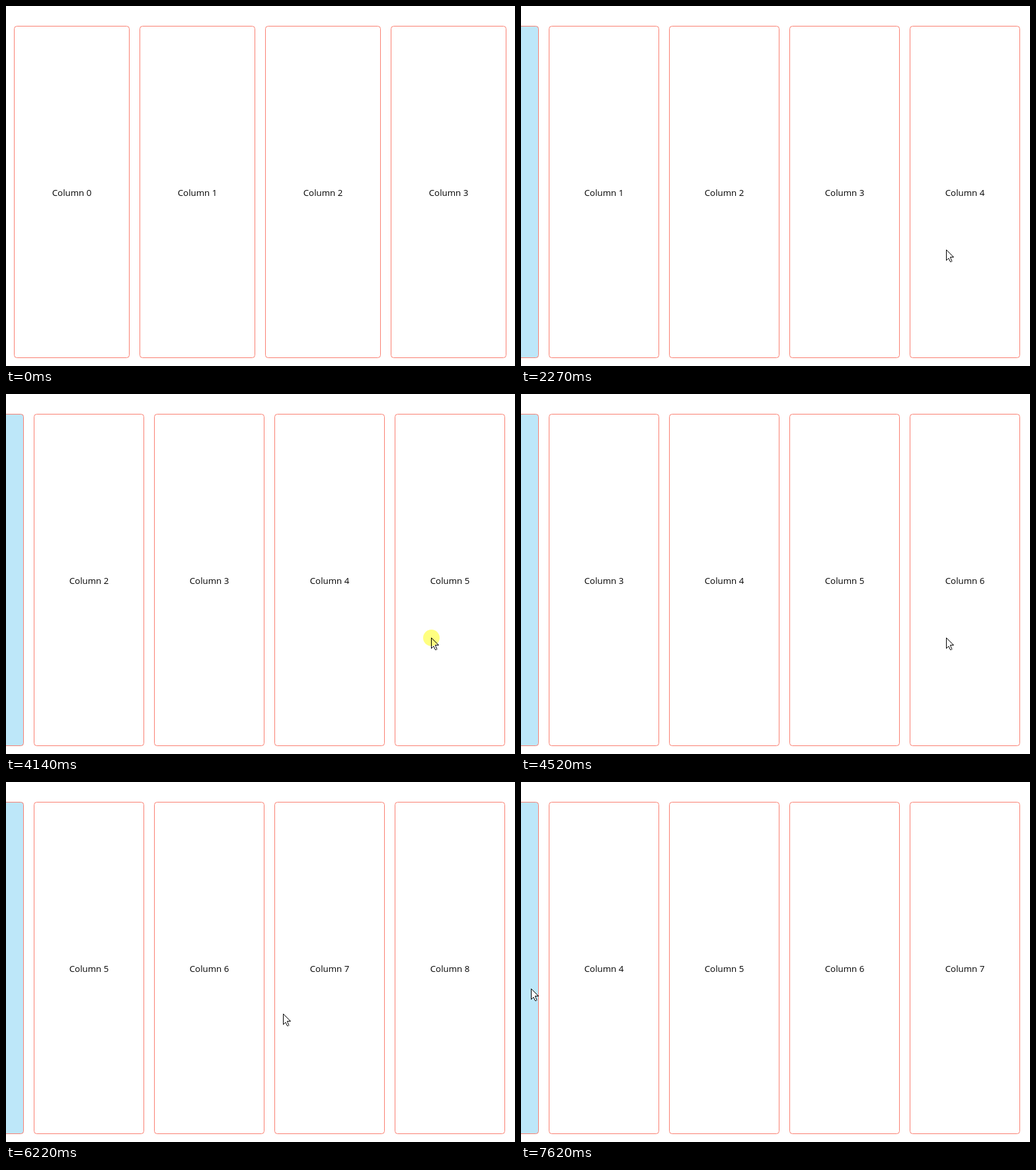
Recreate the animation shown at these times as an HTML page with a canvas. Size 770 by 544 pixels, loop 8 s.

```html
<!DOCTYPE html>
<html lang="en">
<head>
<meta charset="utf-8">
<title>Sliding columns</title>
<style>
  html, body { margin: 0; width: 100%; height: 100%; overflow: hidden; background: #fff; }
  canvas { display: block; }
</style>
</head>
<body>
<canvas width="770" height="544"></canvas>
<script>
const ctx = document.querySelector('canvas').getContext('2d');
const LOOP = 8000, TICK = 76, DELAY = 26, SLIDE = 300;

// Every click opens one more column; the last one goes back.
const clicks = [1850, 3230, 4140, 5110, 5840, 7230];

// Pointer key points: [time, x, y]
const path = [
  [660, 653, 537], [930, 621, 430], [1200, 628, 387], [1350, 628, 387], [1500, 643, 368],
  [6140, 643, 368], [6380, -20, 316], [6680, 14, 312], [LOOP, 15, 312]
];
const arrow = new Path2D('M.5 .5V16.5L3.9 13.1L6.5 18.5H8L8.9 17.6L6.4 11.5H11.5Z');

const clamp = v => Math.min(1, Math.max(0, v));
const mix = (a, b, p) => a + (b - a) * p;

// The CSS "ease" curve, cubic-bezier(.25, .1, .25, 1)
function ease(x) {
  let lo = 0, hi = 1;
  for (let i = 0; i < 20; i++) {
    const s = (lo + hi) / 2;
    if (.75 * s * (1 - s) + s ** 3 < x) lo = s; else hi = s;
  }
  return x >= 1 ? 1 : .3 * lo * (1 - lo) ** 2 + 3 * lo * lo * (1 - lo) + lo ** 3;
}

function drawColumn(i, depth) {
  const x = depth < 1 ? mix(12 + 190 * i, 182 * i - 140, depth) : 42 + 182 * (i - depth);
  const w = 175 - 8 * Math.min(depth, 1);
  ctx.beginPath();
  ctx.roundRect(x + .5, 30.5, w - 1, 501, 4);
  ctx.fillStyle = `rgba(127, 209, 243, ${.51 * clamp(depth - i)})`;
  ctx.fill();
  ctx.strokeStyle = 'salmon';
  ctx.stroke();
  ctx.fillStyle = '#000';
  ctx.fillText('Column ' + i, x + w / 2, 287);
}

function drawPointer(t, pressed) {
  const i = path.findIndex(key => key[0] > t);
  if (i < 1) return;
  const [t0, x0, y0] = path[i - 1], [t1, x1, y1] = path[i];
  if (x0 < 0) return;
  const p = (t - t0) / (t1 - t0);
  ctx.save();
  ctx.translate(Math.round(mix(x0, x1, p)), Math.round(mix(y0, y1, p)));
  ctx.fillStyle = '#fff';
  ctx.strokeStyle = '#000';
  ctx.fill(arrow);
  ctx.stroke(arrow);
  if (pressed) {
    ctx.globalCompositeOperation = 'multiply';
    ctx.fillStyle = '#ffff80';
    ctx.beginPath();
    ctx.arc(.5, .5, 12.5, 0, 7);
    ctx.fill();
  }
  ctx.restore();
}

function draw() {
  const t = performance.now() % LOOP;
  const last = clicks.findLastIndex(c => c <= t);
  const ticks = last < 0 ? 0 : Math.floor((t - clicks[last]) / TICK);
  const progress = ease(clamp((ticks * TICK - DELAY) / SLIDE));
  const back = last === clicks.length - 1;
  const from = Math.max(last, 0);
  const to = back ? from - 1 : last + 1;
  const shown = progress ? to : from;

  ctx.fillStyle = '#fff';
  ctx.fillRect(0, 0, 770, 544);
  ctx.font = '13.3px "Open Sans", "Noto Sans", sans-serif';
  ctx.textAlign = 'center';
  for (let i = 0; i <= shown + 3; i++) drawColumn(i, mix(from, to, progress));
  drawPointer(t, last >= 0 && ticks === 0);
  requestAnimationFrame(draw);
}
draw();
</script>
</body>
</html>
```
